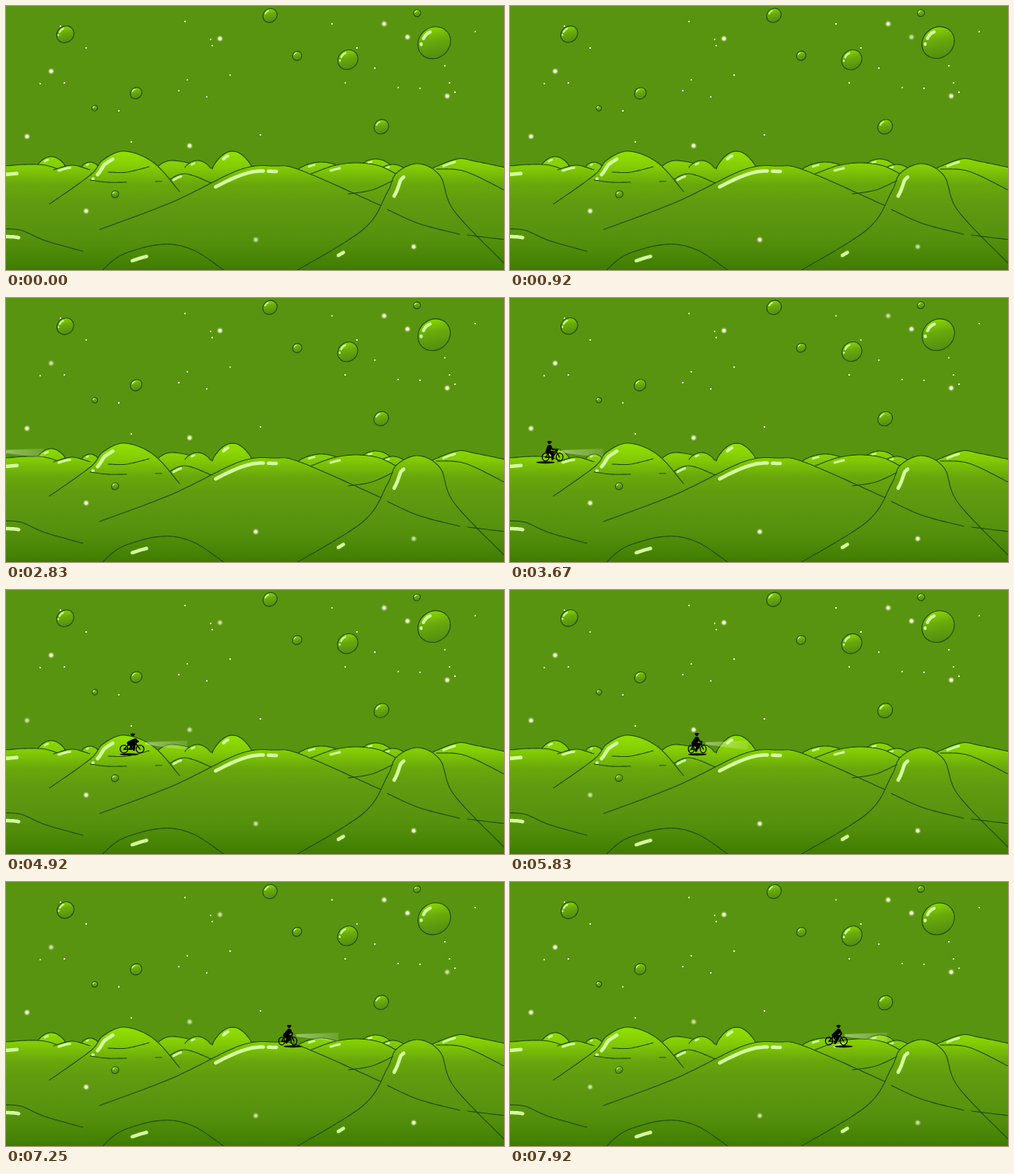
These frames come from a looping animation (640 by 340 pixels, 8 s). An HTML page with a canvas:

```html
<!DOCTYPE html>
<html lang="en">
<head>
<meta charset="utf-8">
<title>Night ride over green hills</title>
<style>
  html, body { margin: 0; width: 100%; height: 100%; overflow: hidden; background: #599410; }
  canvas { display: block; width: 640px; height: 340px; }
</style>
</head>
<body>
<canvas id="stage" width="640" height="340"></canvas>
<script>
const W = 640, H = 340, LOOP = 8, FPS = 12, TAU = Math.PI * 2;
const SKY = '#599410', INK = '#1d4d10', SHINE = '#d3ffa0';
const ctx = document.getElementById('stage').getContext('2d');

// Round mounds on the horizon: x, top, half width, height.
const MOUNDS = [
  [58, 194, 18, 12], [108, 201, 10, 5], [246, 199, 16, 9], [291, 187, 26, 23],
  [405, 201, 30, 10], [475, 197, 19, 8], [497, 204, 18, 8]
];
// Key points of a ridge; glints are x ranges of the line, drawn inset from it.
const RIDGES = [
  { keys: '188 213 212 199 265 209 300 213' },
  { keys: '545 210 580 197 603 200 642 208', glints: [[560, 578]], inset: 3 },
  { keys: '553 210 590 213 642 238' },
  { keys: '-3 206 50 205 100 224 125 227', glints: [[-3, 16]], inset: 11 },
  { keys: '61 211 85 205 108 211', glints: [[66, 83]], inset: 3 },
  { keys: '200 231 228 216 264 228', glints: [[212, 225]], inset: 3 },
  { keys: '385 219 420 206 450 202 480 206 506 219', glints: [[415, 429]], inset: 5 },
  { keys: '56 255 108 218 125 198 153 187 190 202 223 239', glints: [[107, 109], [112, 136]], inset: 6 },
  { keys: '120 288 215 252 300 211 345 206 380 212 484 258', glints: [[265, 331], [337, 349]], inset: 7 },
  { keys: '375 340 460 287 490 240 502 215 530 203 558 219 576 264 642 333', glints: [[417, 430], [489, 506]], inset: 10 }
];
const CREASES = [
  { keys: '131 214 155 214 184 207' },
  { keys: '108 224 130 227 155 227' },
  { keys: '192 226 200 226' },
  { keys: '440 242 470 237 497 225' },
  { keys: '490 262 530 280 583 294' },
  { keys: '593 295 642 301' },
  { keys: '-3 287 20 289 50 302 99 316', glints: [[-3, 19]], inset: 10 },
  { keys: '123 341 150 320 200 307 240 314 281 341', glints: [[156, 180]], inset: 12 }
];
const BUBBLES = [
  [76, 36, 11], [339, 12, 9.3], [528, 9, 4.5], [550, 47, 21], [374, 64, 6],
  [439, 69, 13], [167, 112, 7.5], [114, 131.5, 3.5], [482, 155, 9.5], [140, 242, 4.5]
];
const BIG_STARS = [
  [58, 84], [275, 42], [486, 23], [516, 40], [567, 116],
  [236, 180], [103, 264], [321, 301], [524, 310], [27, 168]
];
const SMALL_STARS = 24;

const hash = (a, b) => {
  const v = Math.sin(a * 127.1 + b * 311.7) * 43758.5453;
  return v - Math.floor(v);
};

// Catmull-Rom samples through a string of key points.
function smooth(keys) {
  const n = keys.split(' ').map(Number), knots = [], out = [];
  for (let i = 0; i < n.length; i += 2) knots.push([n[i], n[i + 1]]);
  for (let i = 0; i < knots.length - 1; i++) {
    const b = knots[i], c = knots[i + 1], a = knots[i - 1] || b, d = knots[i + 2] || c;
    for (let u = 0; u < 1; u += 1 / 16) {
      out.push([0, 1].map(k => b[k] + u / 2 * (c[k] - a[k] +
        u * (2 * a[k] - 5 * b[k] + 4 * c[k] - d[k] + u * (3 * (b[k] - c[k]) + d[k] - a[k])))));
    }
  }
  return [...out, knots[knots.length - 1]];
}

function bell([x, top, half, height]) {
  const out = [];
  for (let d = -1; d <= 1; d += 1 / 16) {
    const lift = Math.pow(Math.max(0, Math.cos(d * Math.PI / 2)), .75);
    out.push([x + d * half, top + height * (1 - lift)]);
  }
  return out;
}

function trace(g, points) {
  g.beginPath();
  points.forEach(p => g.lineTo(...p));
}

function drawGlint(g, points, from, to, inset, width) {
  const shifted = [];
  for (let i = 1; i < points.length; i++) {
    const [x, y] = points[i], dx = x - points[i - 1][0], dy = y - points[i - 1][1];
    const size = Math.hypot(dx, dy);
    if (x >= from && x <= to) shifted.push([x - dy / size * inset, y + dx / size * inset]);
  }
  g.strokeStyle = SHINE;
  g.lineWidth = width;
  trace(g, shifted);
  g.stroke();
}

function drawLandscape() {
  const layer = document.createElement('canvas');
  layer.width = W;
  layer.height = H;
  const g = layer.getContext('2d');
  const slope = g.createLinearGradient(0, 186, 0, H);
  ['#93e200', '#83cb04', '#69a70c', '#609b10', '#5c9610', '#57920e', '#4d8908', '#3e7c01']
    .forEach((color, i, all) => slope.addColorStop(i / (all.length - 1), color));

  const drawLine = (points, filled) => {
    if (filled) {
      g.fillStyle = slope;
      trace(g, points);
      g.lineTo(points[points.length - 1][0], H);
      g.lineTo(points[0][0], H);
      g.fill();
    }
    g.strokeStyle = INK;
    g.lineWidth = 1.1;
    trace(g, points);
    g.stroke();
  };
  const drawRidge = ({ keys, glints = [], inset }, filled) => {
    const points = smooth(keys);
    drawLine(points, filled);
    for (const [from, to] of glints) drawGlint(g, points, from, to, inset, inset > 5 ? 4.5 : 3);
  };

  g.fillStyle = SKY;
  g.fillRect(0, 0, W, H);
  g.lineCap = g.lineJoin = 'round';
  const [first, ...others] = RIDGES;
  drawRidge(first, true);
  for (const mound of MOUNDS) {
    const points = bell(mound), [x, , half, height] = mound;
    drawLine(points, true);
    drawGlint(g, points, x - half * .62, x - half * .3, 2 + height / 9, 1.5 + height / 9);
  }
  others.forEach(ridge => drawRidge(ridge, true));
  CREASES.forEach(crease => drawRidge(crease, false));
  return layer;
}

function drawBubble([x, y, r], index, step) {
  const boil = Math.floor(step / 2), wobble = k => hash(index * 5 + k, boil) - .5;
  ctx.save();
  ctx.translate(x + .3 + wobble(1) * .5, y + .3 + wobble(2) * .5);
  const paint = ctx.createLinearGradient(-r * .2, -r, r * .2, r);
  paint.addColorStop(0, '#8cd805');
  paint.addColorStop(.4, '#6aab0c');
  paint.addColorStop(1, '#528b10');
  ctx.fillStyle = paint;
  ctx.strokeStyle = INK;
  ctx.lineWidth = 1.1;
  ctx.lineCap = 'round';
  ctx.beginPath();
  ctx.ellipse(0, 0, r * 1.04 + wobble(3) * .4, r * .93 + wobble(4) * .4, -.7, 0, TAU);
  ctx.fill();
  ctx.stroke();
  ctx.strokeStyle = SHINE;
  ctx.lineWidth = Math.max(1.3, r * .19);
  ctx.beginPath();
  ctx.arc(0, 0, r * .7, 3.5, 4.35);
  ctx.stroke();
  if (r > 10) {
    ctx.beginPath();
    ctx.arc(0, 0, r * .8, 3, 3.05);
    ctx.stroke();
  }
  ctx.restore();
}

function drawStars(step) {
  BIG_STARS.forEach(([x, y], i) => {
    const glow = ctx.createRadialGradient(x, y, 0, x, y, 4.5);
    glow.addColorStop(0, '#fbffee');
    glow.addColorStop(.4, 'rgba(243,255,225,.95)');
    glow.addColorStop(.65, 'rgba(220,240,180,.4)');
    glow.addColorStop(1, 'rgba(200,230,150,0)');
    ctx.globalAlpha = hash(i + 3, step) < .2 ? .7 : 1;
    ctx.fillStyle = glow;
    ctx.fillRect(x - 5, y - 5, 10, 10);
  });
  ctx.fillStyle = '#ecffd0';
  for (let i = 0; i < SMALL_STARS; i++) {
    ctx.globalAlpha = .7 + hash(i + 31, step) * .3;
    ctx.fillRect(Math.round(hash(i, 4) * W), Math.round(14 + hash(i, 9) * 168), 2, 2);
  }
  ctx.globalAlpha = 1;
}

function line(width, ...p) {
  ctx.lineWidth = width;
  ctx.beginPath();
  for (let i = 0; i < p.length; i += 2) ctx.lineTo(p[i], p[i + 1]);
  ctx.stroke();
}

function drawRider(time) {
  const ride = time - 3.67, crest = ride - 1.25;
  const crouch = Math.exp(-Math.pow(crest / .35, 2));
  const squeeze = .87 + .13 * Math.cos(crest * TAU / 1.66);
  const lean = -4 + 1.6 * ride + 3 * crouch;
  const beamX = 11 + 6 * crouch;
  ctx.save();
  ctx.translate(55 + 85.8 * ride, 0);

  const beam = ctx.createLinearGradient(beamX, 0, beamX + 54, 0);
  beam.addColorStop(0, 'rgba(225,240,200,.5)');
  beam.addColorStop(1, 'rgba(225,240,200,.15)');
  ctx.fillStyle = beam;
  ctx.beginPath();
  ctx.moveTo(beamX, 196);
  ctx.lineTo(beamX + 54, 194);
  ctx.lineTo(beamX + 54, 206);
  ctx.lineTo(beamX, 199);
  ctx.fill();

  ctx.fillStyle = ctx.strokeStyle = '#000';
  ctx.lineCap = ctx.lineJoin = 'round';
  ctx.beginPath();
  ctx.ellipse(-9 + 4.3 * ride, 211.8, 12, 1.5, 0, 0, TAU);
  ctx.fill();

  const wheel = 10.3 * squeeze;
  ctx.lineWidth = 1.2;
  for (const hub of [-wheel, wheel]) {
    ctx.beginPath();
    ctx.ellipse(hub, 204.8, 5 * squeeze, 5, 0, 0, TAU);
    ctx.stroke();
  }
  line(1.3, -wheel, 205, -4, 199, 5, 198, wheel, 205);
  line(1.3, -wheel, 205, 0, 205, 5, 198, 6, 195);
  line(1.3, -4, 197, 0, 205);

  const hipX = -4 + lean * .5, hipY = 197.5;
  const chestX = lean + crouch * 3, chestY = 191 + crouch * 2;
  for (const phase of [0, Math.PI]) {
    const turn = time * 9 + phase;
    const footX = Math.cos(turn) * 2.5, footY = 205 + Math.sin(turn) * 2.5;
    line(3, hipX, hipY, (hipX + footX) / 2 + 3.5, (hipY + footY) / 2 - 1.5, footX, footY);
  }
  line(6, hipX, hipY, chestX, chestY + 1);
  line(2, chestX + 1, chestY, chestX + 4, 195, 6, 196);
  const headY = 186 + crouch * .5;
  ctx.beginPath();
  ctx.arc(lean, headY, 2.1, 0, TAU);
  ctx.fill();
  line(1.2, lean - 2.5, headY - .8, lean + 2.5, headY - .8);
  ctx.restore();
}

const landscape = drawLandscape();
const start = performance.now();

function frame() {
  const time = (performance.now() - start) / 1000 % LOOP;
  const step = Math.floor((time + .004) * FPS) % (LOOP * FPS);
  ctx.drawImage(landscape, 0, 0);
  BUBBLES.forEach((bubble, i) => drawBubble(bubble, i, step));
  drawRider(step / FPS);
  drawStars(step);
  requestAnimationFrame(frame);
}
frame();
</script>
</body>
</html>
```
